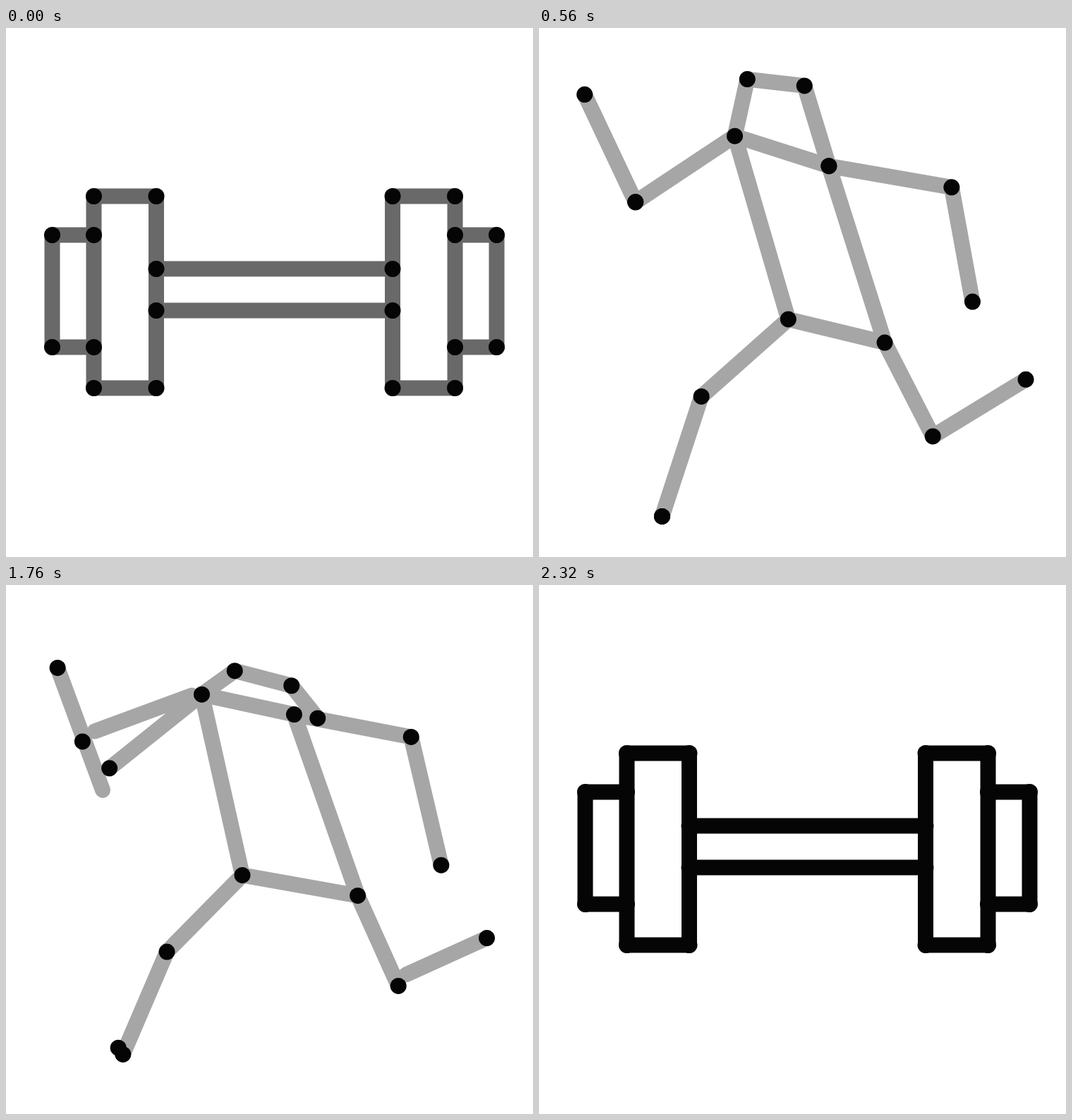
Recreate the animation shown at these times as an HTML page with a canvas. Size 747 by 750 pixels, loop 3280 ms.

```html
<!DOCTYPE html>
<html lang="en">
<head>
<meta charset="utf-8">
<title>Dumbbell and runner</title>
<style>
html, body { margin: 0; width: 100%; height: 100%; overflow: hidden; background: #fff; }
canvas { display: block; }
</style>
</head>
<body>
<canvas id="stage" width="747" height="750"></canvas>
<script>
const LOOP = 3280, STEP = 80, MID = 380, BLACK = '#050505', GREY = '#a6a6a6', DIM = '#696969';
const ctx = document.getElementById('stage').getContext('2d');
ctx.translate(0.5, 0.5);

const points = (...n) => n.flatMap((x, i) => i % 2 ? [] : [[x, n[i + 1]]]);
const pick = (list, ids) => ids.map(i => list[i]);
const mix = (a, b, p) => a.map(([x, y], i) => [x + (b[i][0] - x) * p, y + (b[i][1] - y) * p]);

// Dumbbell: joints 0-9 on the left, 10-19 their mirror image
const INNER = 167.5, OUTER = 256, CAP = 315;
const half = points(OUTER, 238, INNER, 238, CAP, 293, OUTER, 293, CAP, 452, OUTER, 452,
  OUTER, 510, INNER, 510, INNER, 341, INNER, 400);
const bell = [-1, 1].flatMap(side => half.map(([d, y]) => [MID + side * d, y]));
const plate = [[0, 1, 8, 9, 7, 6, 5, 3, 0], [3, 2, 4, 5]];
const bellPaths = [...plate, ...plate.map(path => path.map(i => i + 10)), [8, 18], [9, 19]];

// The right plate shears, the left one stretches and its lower bar joint is pulled in
function bend(p) {
  const joints = bell.map(([x, y]) => {
    if (x > MID) return [x + p * 0.07 * (y - 452), y];
    const k = p * (MID - INNER - x) / (OUTER - INNER);
    return [x + k * 0.025 * (y - 400) + p * 0.13 * Math.max(0, MID - OUTER - x), y + k * 0.06 * (y - 300)];
  });
  joints[9][0] += 25 * p;
  return joints;
}

// Runner: left hand, elbow, shoulder; head; right shoulder, elbow, hand; hips; left leg; right leg.
// The joints that come apart on the way back are doubled.
const split = [0, 1, 1, 2, 3, 4, 5, 5, 6, 7, 8, 9, 10, 11, 12, 12, 13, 1, 2, 1, 11];
const runner = (...n) => pick(points(...n), split);
const rise = pick(pick(bend(1), [0, 1, 8, 8, 18, 18, 11, 10, 9, 19, 7, 6, 17, 16]), split);
const stride = runner(73, 115, 197, 329, 269, 168, 327, 105, 427, 118, 447, 234, 599, 237,
  622, 422, 336, 411, 502, 436, 226, 519, 163, 667, 557, 566, 680, 500);
const leap = runner(61, 86, 114, 216, 280, 147, 283, 60, 357, 68, 397, 181, 579, 221,
  611, 375, 359, 413, 485, 449, 231, 523, 178, 701, 558, 583, 693, 497);
const land = mix(leap, stride, 0.05);
const loose = points(95, 177, 174, 430, 203, 336, 272, 168, 402, 241, 493, 288, 526, 198,
  425, 182, 561, 201, 626, 436, 287, 407, 523, 423, 221, 513, 141, 595,
  551, 539, 585, 490, 658, 506, 140, 177, 229, 172, 87, 221, 121, 567);
const settle = pick(bell, [0, 6, 8, 1, 8, 18, 11, 11, 10, 16, 9, 19, 7, 6, 17, 17, 16, 0, 1, 2, 4]);
const runnerPaths = [[0, 1], [2, 3, 4, 5, 6], [3, 7, 8, 9], [3, 10, 11, 7], [10, 12, 13], [11, 14], [15, 16], [17, 18]];
const bare = [1, 15, 17, 18];

function paint(joints, paths, dots, color) {
  ctx.fillStyle = '#fff';
  ctx.fillRect(-1, -1, 749, 752);
  ctx.lineWidth = 22;
  ctx.lineCap = ctx.lineJoin = 'round';
  ctx.strokeStyle = color;
  ctx.beginPath();
  for (const path of paths) path.forEach((id, i) => ctx[i ? 'lineTo' : 'moveTo'](...joints[id]));
  ctx.stroke();
  ctx.fillStyle = BLACK;
  for (const [x, y] of dots) {
    ctx.beginPath();
    ctx.arc(x, y, 11.5, 0, 7);
    ctx.fill();
  }
}

function lift(p, color) {
  const joints = bend(p), dots = bend(p);
  dots[3][1] -= 25 * p; // two dots slide along the left plate
  dots[5][1] += 35 * p;
  if (p === 1) dots.splice(14, 1);
  paint(joints, bellPaths, dots, color);
}

function run(from, to, p) {
  const joints = mix(from, to, p);
  paint(joints, runnerPaths, joints.filter((_, i) => !bare.includes(i)), GREY);
}

function draw(t) {
  if (t <= 240) lift((t / 240) ** 2, t ? GREY : DIM);
  else if (t < 400) run(rise, stride, (t - 240) / 160);
  else if (t < 1600) run(stride, leap, 1 - Math.max(0, (720 - t) / 320) ** 1.9);
  else if (t < 1920) run(land, loose, ((t - 1600) / 320) ** 1.6);
  else if (t < 2080) run(loose, settle, (t - 1920) / 160);
  else lift(0, [GREY, DIM, '#2c2c2c'][(t - 2080) / STEP] || BLACK);
}

function tick(now) {
  draw(Math.floor(now % LOOP / STEP) * STEP);
  requestAnimationFrame(tick);
}
tick(performance.now());
</script>
</body>
</html>
```
